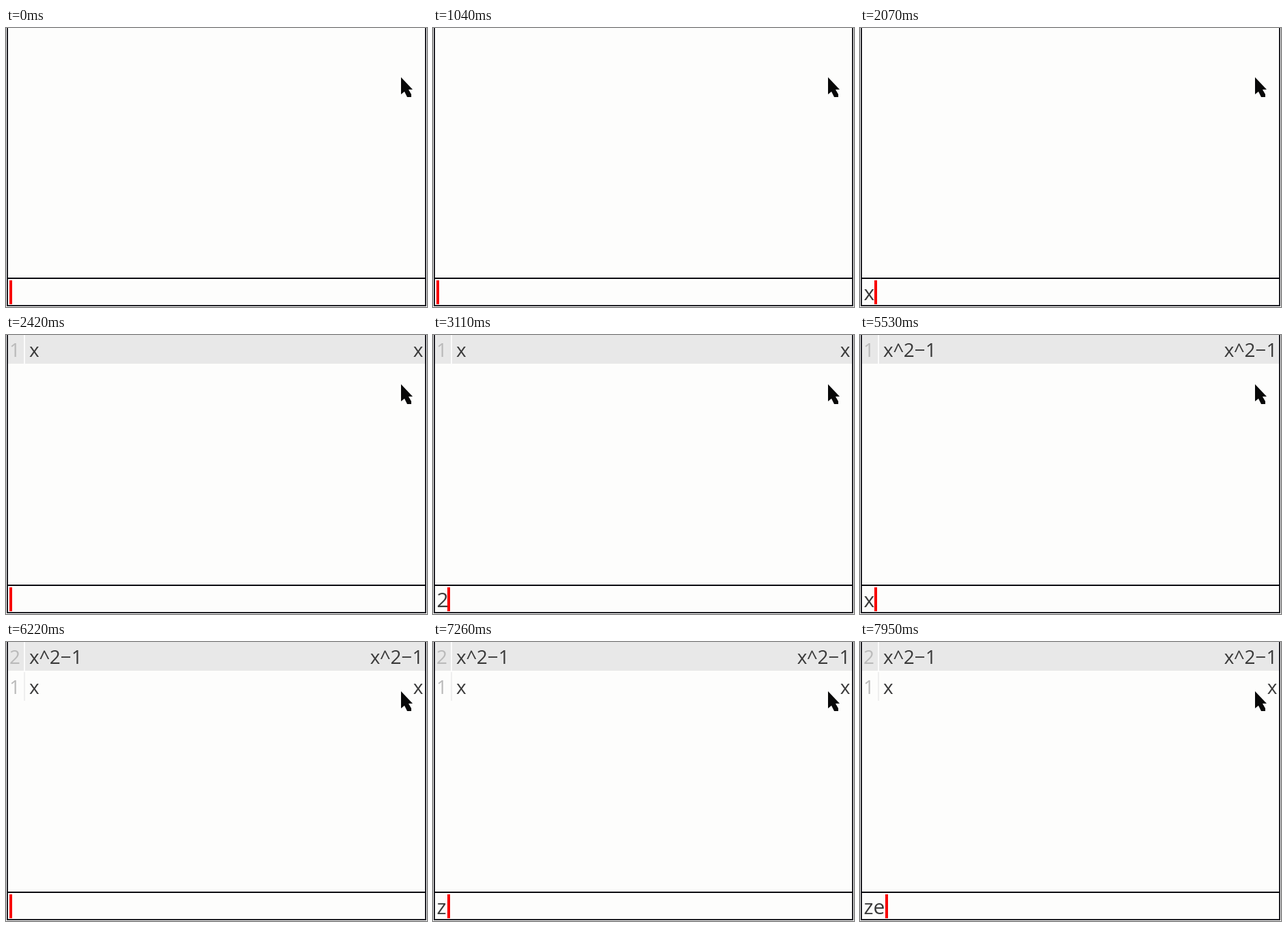
These frames come from a looping animation (616 by 408 pixels, 8 s). An HTML page with a canvas:

```html
<!DOCTYPE html>
<html lang="en">
<head>
<meta charset="utf-8">
<title>RPN calculator</title>
<style>
  html, body { margin: 0; width: 100%; height: 100%; overflow: hidden; background: #fdfdfc; }
  canvas { display: block; }
</style>
</head>
<body>
<canvas id="stage" width="616" height="408"></canvas>
<script>
const ctx = document.getElementById('stage').getContext('2d');
const LOOP = 8000;
const PAPER = '#fdfdfc', INK = '#3a3a3a', FRAME = '#1e1e24', LABEL = '#bababa';

// Each step: start time, typed input, stack from top row to bottom row.
const steps = [
  { at: 0, input: '', stack: [] },
  { at: 2070, input: 'x', stack: [] },
  { at: 2420, input: '', stack: ['x'] },
  { at: 3110, input: '2', stack: ['x'] },
  { at: 3460, input: '', stack: ['x^2'] },
  { at: 4150, input: '1', stack: ['x^2'] },
  { at: 4490, input: '', stack: ['x^2−1'] },
  { at: 5530, input: 'x', stack: ['x^2−1'] },
  { at: 6220, input: '', stack: ['x^2−1', 'x'] },
  { at: 7260, input: 'z', stack: ['x^2−1', 'x'] },
  { at: 7950, input: 'ze', stack: ['x^2−1', 'x'] },
];

function rect(x, y, w, h, color) {
  ctx.fillStyle = color;
  ctx.fillRect(x, y, w, h);
}

function text(str, x, baseline, size, color, align = 'left') {
  ctx.font = `${size}px "Open Sans", "Noto Sans", sans-serif`;
  ctx.textAlign = align;
  ctx.fillStyle = color;
  ctx.fillText(str, x, baseline);
}

function drawRow(value, row, level) {
  const top = row * 44, baseline = 31.5 + row * 44;
  if (row === 0) rect(2, 0, 612, 42, '#e8e8e8');
  rect(26, top, 2, 42, row === 0 ? '#fbfbfb' : '#eeeeee');
  text(level, 5, baseline, 28, LABEL);
  text(value, 34, baseline, 28, INK);
  text(value, 610.5, baseline, 28, INK, 'right');
}

function drawInput(str) {
  text(str, 5.5, 398, 30, INK);
  rect(5 + 16 * str.length, 369, 4, 35, '#f80000');
}

function drawFrame() {
  rect(1, 0, 2, 407, FRAME);
  rect(613, 0, 2, 407, FRAME);
  rect(1, 405, 614, 2, FRAME);
  rect(2, 365, 612, 2, '#0c0c10');
}

function drawPointer() {
  ctx.fillStyle = '#080808';
  ctx.fill(new Path2D('M578 72V97L583 93L587 101H593V97L589 90H595Z'));
}

function draw(now) {
  const t = now % LOOP;
  const { input, stack } = steps.findLast(step => step.at <= t);
  rect(0, 0, 616, 408, PAPER);
  stack.forEach((value, row) => drawRow(value, row, stack.length - row));
  drawInput(input);
  drawFrame();
  drawPointer();
}

function tick() {
  draw(performance.now());
  requestAnimationFrame(tick);
}
tick();
</script>
</body>
</html>
```
